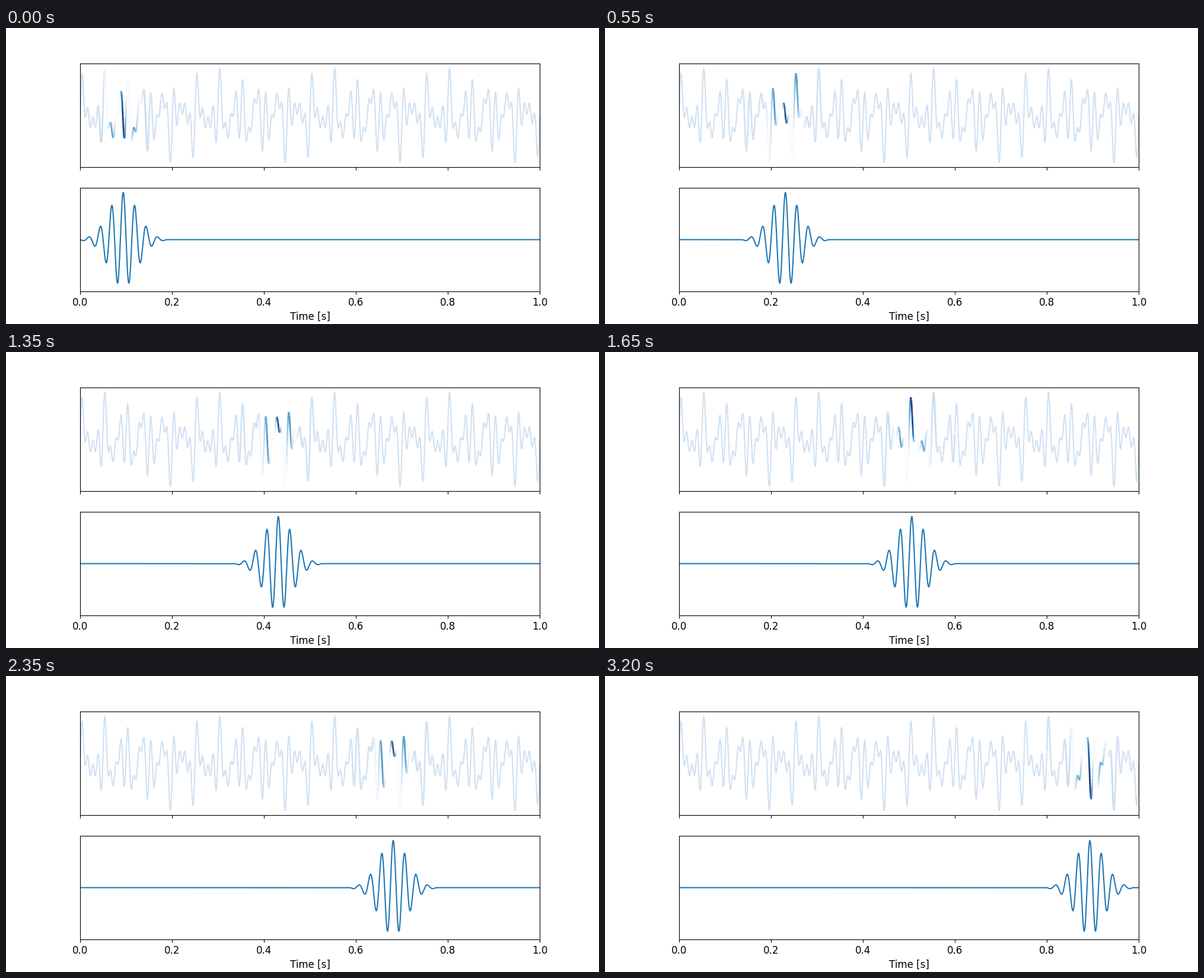
A matplotlib script for the animation above (3250 ms loop, 1000 by 500 pixels).

```python
import numpy as np
import matplotlib.pyplot as plt
from matplotlib.animation import FuncAnimation
from matplotlib.collections import LineCollection

RATE = 8000          # samples per second
STEP = 100           # samples the wavelet moves per frame
FRAMES = 65
SIGMA = 1 / 32
FREQ = 40

plt.rcParams["font.family"] = "DejaVu Sans"
plt.rcParams["font.size"] = 12

# Test signal: four equal sines, scaled to a peak of one
t = np.arange(RATE) / RATE
signal = sum(np.sin(2 * np.pi * f * t) for f in (24, 40, 60, 80))
signal /= np.abs(signal).max()

# Gaussian wavelet, cut at three sigmas
size = int(6 * SIGMA * RATE)
tau = np.arange(size) / RATE - 3 * SIGMA
envelope = np.exp(-tau**2 / (2 * SIGMA**2))
wavelet = envelope * np.cos(2 * np.pi * FREQ * tau)
weight = wavelet * envelope

points = np.column_stack([t, signal])
segments = np.stack([points[:-1], points[1:]], axis=1)

fig, (top, bottom) = plt.subplots(2, 1, sharex=True, figsize=(10, 5), dpi=100)
for ax in (top, bottom):
    ax.set_xlim(0, 1)
    ax.set_ylim(-1.1, 1.1)
    ax.set_yticks([])
bottom.set_xlabel("Time [s]")

pale = plt.cm.Blues(0.2)
before, = top.plot([], [], color=pale, lw=1.5)
after, = top.plot([], [], color=pale, lw=1.5)
window = LineCollection([], cmap="Blues", norm=plt.Normalize(-0.25, 1), lw=2)
window.set_array(weight[:-1])
top.add_collection(window, autolim=False)
pulse, = bottom.plot([], [], color="C0", lw=1.5)


def update(frame):
    start = frame * STEP
    end = start + size
    before.set_data(t[:start], signal[:start])
    after.set_data(t[end:], signal[end:])
    window.set_segments(segments[start:end - 1])
    shifted = np.zeros_like(t)
    shifted[start:end] = wavelet
    pulse.set_data(t, shifted)
    return before, after, window, pulse


anim = FuncAnimation(fig, update, frames=FRAMES, interval=50,
                     init_func=lambda: update(0), repeat=True, repeat_delay=0)
plt.show()
```
